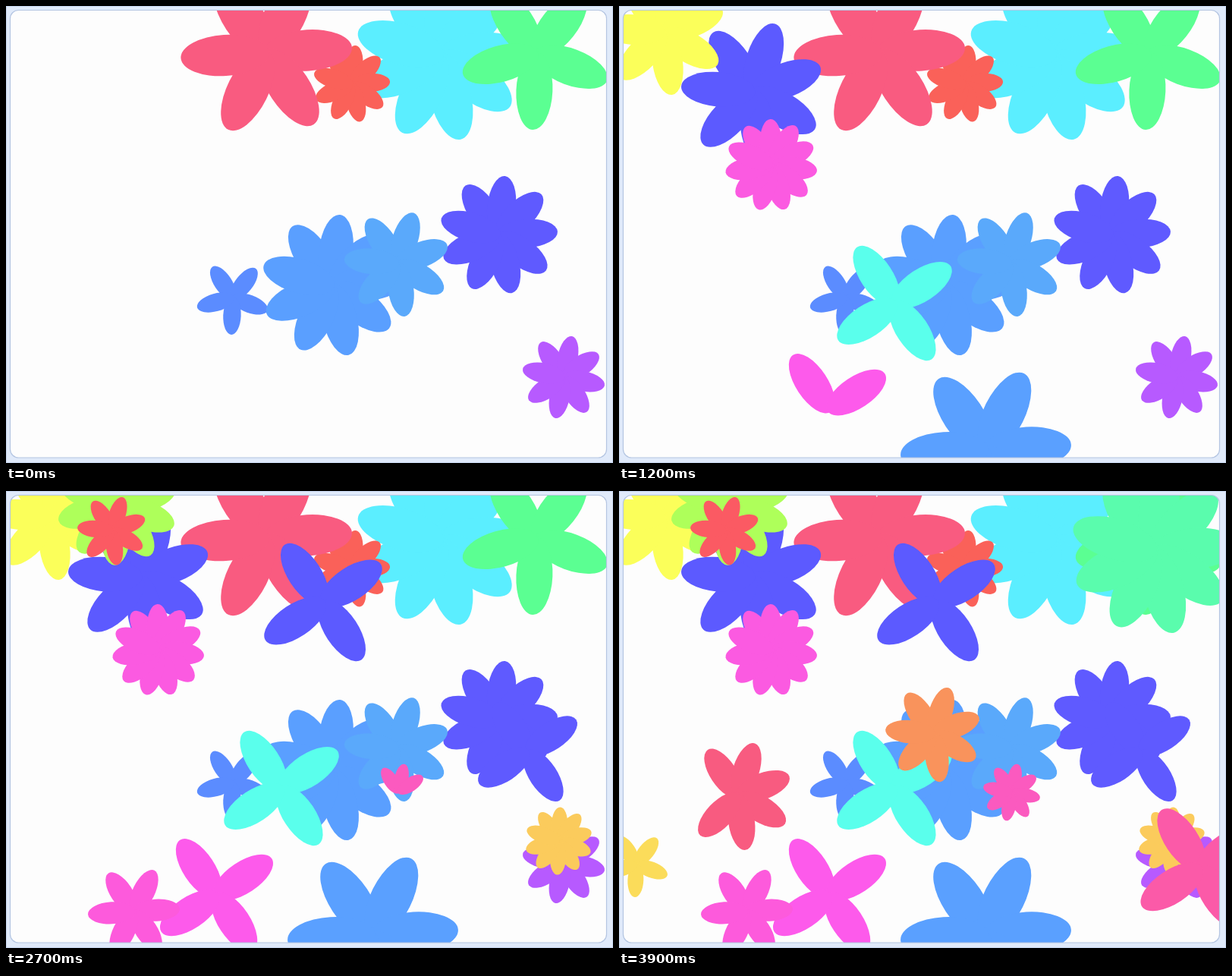
Animation, 800 px wide and 602 px high, one loop 4000 ms. Source, as an HTML page with a canvas:

```html
<!DOCTYPE html>
<html lang="en">
<head>
<meta charset="utf-8">
<title>Flowers</title>
<style>
  html, body { margin: 0; width: 100%; height: 100%; overflow: hidden; background: #e0eafa; }
  canvas { display: block; }
</style>
</head>
<body>
<canvas id="stage" width="800" height="602"></canvas>
<script>
const ctx = document.getElementById('stage').getContext('2d');
const LOOP = 4000, STEP = 100;
const FIRST_ANGLE = -123.5 * Math.PI / 180;

// Each flower: petal count, centre x, centre y, petal length, colour
const planted = [
  [9, 572.9, 65.5, 113.3, '#5beeff'],
  [9, 455.2, 102.7, 51, '#fa6159'],
  [6, 343.2, 61.7, 113, '#f95b80'],
  [5, 698.5, 63.2, 99.9, '#5bff92'],
  [9, 648.8, 301.9, 78.3, '#5f5aff'],
  [8, 735, 489, 55, '#b75aff'],
  [5, 299, 384.2, 48.8, '#5b8cff'],
  [9, 429.7, 368.4, 93.9, '#5a9fff'],
  [7, 515.8, 339.4, 70.2, '#5aa9fb']
];
const growing = [
  [7, 176.6, 113.8, 94.9, '#5c5aff'],
  [11, 200.6, 209.7, 60.8, '#fb5ae1'],
  [4, 363, 391.5, 88.7, '#5affec'],
  [7, 58.7, 34.7, 83, '#fbff5a'],
  [6, 483.5, 584.8, 112.6, '#5aa0ff'],
  [4, 277.5, 532.5, 87.3, '#fd5aeb'],
  [10, 146.4, 18, 79.9, '#aeff5a'],
  [4, 418, 146.5, 91.1, '#5c5aff'],
  [4, 687.5, 343.5, 76.7, '#5f5aff'],
  [10, 728.5, 461, 44.6, '#fbcb5c'],
  [7, 139.9, 52, 46, '#fb5a63'],
  [6, 168.5, 554, 60.6, '#fd5adc'],
  [8, 517.5, 397, 38, '#fb5abf'],
  [7, 414.7, 320, 63.8, '#f9935c'],
  [5, 22.8, 491.5, 43.6, '#fbdc5a'],
  [9, 705.5, 78.7, 111, '#5afcad'],
  [4, 766, 496.7, 92, '#fb5aa8'],
  [7, 156.8, 401.2, 72.3, '#f85b80']
];

// Draws up to `limit` petals clockwise and returns how many were drawn
function drawFlower([petals, x, y, length, color], limit = petals) {
  const count = Math.min(petals, limit);
  ctx.fillStyle = color;
  for (let i = 0; i < count; i++) {
    const angle = FIRST_ANGLE + i * 2 * Math.PI / petals;
    const offset = length * 0.485;
    ctx.beginPath();
    ctx.ellipse(x + offset * Math.cos(angle), y + offset * Math.sin(angle),
      length * 0.515, length * 0.24, angle, 0, 2 * Math.PI);
    ctx.fill();
  }
  return count;
}

function framePath() {
  ctx.beginPath();
  ctx.roundRect(5.5, 5.5, 786, 589.5, 11);
}

function draw(time) {
  const step = Math.floor(time % LOOP / STEP);
  let budget = step ? Math.floor(3.05 * step + 1.02) : 0;

  ctx.fillStyle = '#e0eafa';
  ctx.fillRect(0, 0, 800, 602);
  ctx.save();
  framePath();
  ctx.fillStyle = '#fdfdfd';
  ctx.fill();
  ctx.clip();
  planted.forEach(flower => drawFlower(flower));
  for (const flower of growing) {
    if (budget <= 0) break;
    budget -= drawFlower(flower, budget);
  }
  ctx.restore();

  framePath();
  ctx.strokeStyle = '#b4c5e2';
  ctx.lineWidth = 1.2;
  ctx.stroke();
  ctx.strokeStyle = '#c6d5ee';
  ctx.lineWidth = 1;
  ctx.strokeRect(0.5, 0.5, 799, 601);
}

let start;
function tick(now) {
  start ??= now;
  draw(now - start);
  requestAnimationFrame(tick);
}
draw(0);
requestAnimationFrame(tick);
</script>
</body>
</html>
```
